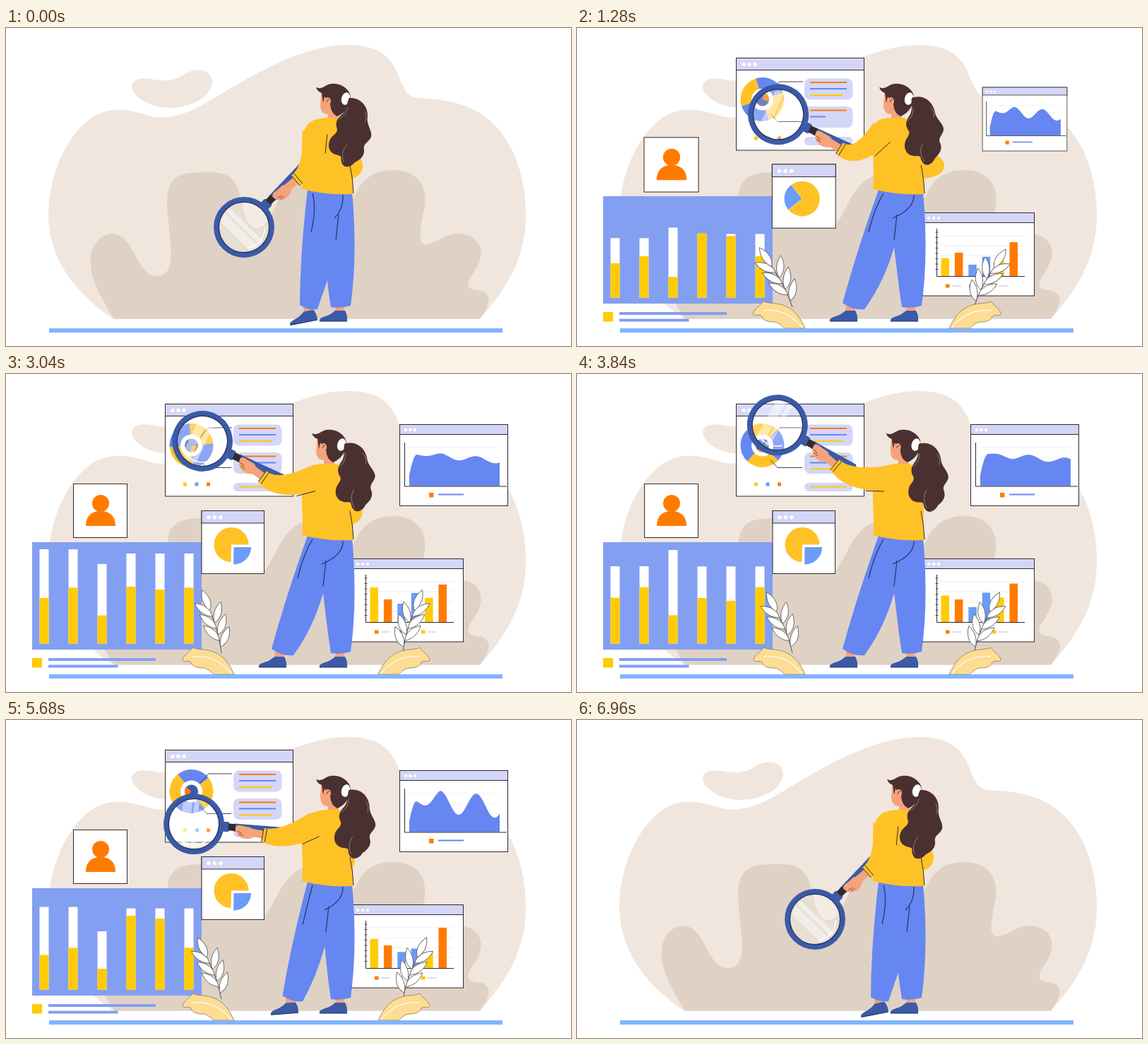
An HTML page for the animation above (7000 ms loop, 800 px wide and 450 px high).

```html
<!DOCTYPE html>
<html lang="en">
<head>
<meta charset="utf-8">
<title>Data research</title>
<style>
  html, body { margin: 0; width: 100%; height: 100%; overflow: hidden; background: #fff; }
  svg { display: block; width: 100vw; height: 100vh; }
</style>
</head>
<body>
<svg id="stage" viewBox="0 0 800 450"></svg>
<script>
const LOOP = 7000;
const C = { sand: '#f0e6dd', hill: '#dfd2c5', blue: '#6686f2', panel: '#839ff1', sky: '#6a9cf8', navy: '#3b5aa7', crease: '#26335f',
  yellow: '#ffc226', gold: '#ffcb05', orange: '#ff7b00', lilac: '#d4d6f8', ink: '#33292c', hair: '#4b3031', skin: '#f6a37c' };

// ---------- markup helpers ----------
const rect = (x, y, w, h, fill, extra = '') => `<rect x="${x}" y="${y}" width="${w}" height="${h}" fill="${fill}" ${extra}/>`;
const circle = (x, y, r, fill, extra = '') => `<circle cx="${x}" cy="${y}" r="${r}" fill="${fill}" ${extra}/>`;
const path = (d, fill, extra = '') => `<path d="${d}" fill="${fill}" ${extra}/>`;
const line = (d, color, width = 1, extra = '') =>
  `<path d="${d}" fill="none" stroke="${color}" stroke-width="${width}" ${extra}/>`;
const group = (id, body) => `<g id="${id}">${body}</g>`;
const repeat = (n, f) => Array.from({ length: n }, (_, i) => f(i)).join('');
const edge = `stroke="${C.ink}"`;
const frame = (x, y, w, h, head, dotX, gap, r) =>
  rect(x, y, w, h, '#fff', edge) + rect(x, y, w, head, C.lilac, edge) +
  repeat(3, i => circle(dotX + i * gap, y + head / 2 + .5, r, '#fff'));
const drawn = name => `pathLength="1" stroke-dasharray="1 2" class="${name}"`;
const wedge = (x, y, r, from, sweep) => {
  const at = a => `${x + r * Math.cos(a * Math.PI / 180)} ${y + r * Math.sin(a * Math.PI / 180)}`;
  return `M${x} ${y}L${at(from)}A${r} ${r} 0 0 1 ${at(from + sweep)}Z`;
};

// ---------- scene ----------
const backdrop =
  path('M152 411.500C102 378 60 330 60 262C62 192 98 137 130 122C162 108 190 121 210 126C240 130 268 116 300 96C350 66 420 24 485 24C530 24 546 44 555 66C565 92 570 97 582 99C625 101 664 106 697 143C724 174 736 220 736 265C736 322 712 366 671 411.500Z', C.sand) +
  path('M178 84C178 72 190 70 204 72C228 76 236 75 250 67C268 54 292 58 292 77C290 98 262 113 232 113C204 113 180 98 178 84Z', C.sand) +
  path('M153 411.500C132 378 117 350 120 322C126 292 152 284 167 298C184 314 189 351 215 351C239 349 234 316 231 284C227 244 221 208 262 205C290 203 315 201 326 222C337 244 335 284 358 283C380 278 384 214 432 206C460 210 480 262 495 235C508 207 528 201 550 201C586 202 598 228 592 256C586 288 582 307 596 306C612 304 622 291 640 291C668 292 680 312 668 336C662 348 652 357 655 366C660 373 670 369 678 374C688 382 684 394 671 411.500Z', C.hill);

const note = (i, y, h, rows) =>
  group('note' + i, rect(322, y, 68.5, h, C.lilac, `rx="${Math.min(8, h / 2)}"`)) +
  rows.map((c, k) => line(`M330 ${y + 5.5 + k * 9}H${k === 2 ? 377 : 382}`, c, 2, drawn('ink'))).join('');
const report = frame(225.5, 42.5, 181, 130.5, 17, 236, 8, 2.7) +
  repeat(4, i => path('', i % 2 ? C.yellow : C.blue, 'class="ring"')) +
  circle(262.5, 101, 15.5, '#fff') + circle(262.5, 101, 9.5, C.navy) + path('', C.orange, 'id="core"') +
  line('M275 89L287 76H320', C.ink, .9, drawn('lead')) + line('M274 122L284 132.5H319', C.ink, .9, drawn('lead')) +
  note(0, 71.5, 30, [C.orange, C.blue, C.gold]) + note(1, 111, 30, [C.orange, C.blue, C.gold]) + note(2, 154, 12, [C.gold]) +
  [C.gold, C.sky, C.orange].map((c, i) => rect(251 + i * 16.5, 153.5, 5, 5, c)).join('');

const columns = rect(37, 238, 240, 152, C.panel) +
  repeat(6, i => rect(47.5 + i * 41, 0, 13, 0, '#fff', 'class="total"') + rect(47.5 + i * 41, 0, 13, 0, C.gold, 'class="part"'));
const caption = rect(37, 402, 14, 13.5, C.gold) + rect(60, 402, 152, 4, C.panel) + rect(60, 411.5, 98.5, 4, C.panel);

const bars = frame(489.5, 261.5, 158, 117.5, 14, 498, 7, 2.2) +
  repeat(4, i => line(`M510 ${294 + i * 14}H634`, '#eeeeee')) +
  [C.gold, C.orange, C.sky, C.sky, C.gold, C.orange].map((c, i) => rect(515.5 + i * 19.4, 0, 11.5, 0, c, 'class="bar"')).join('') +
  line('M509.5 284V351.5H634', C.ink) + repeat(8, i => line(`M507.5 ${289 + i * 7.5}h4`, C.ink, .8)) +
  [C.orange, C.sky, C.gold].map((c, i) =>
    rect(522 + i * 33, 362.5, 5.5, 5, c) + line(`M${531 + i * 33} 365h13`, '#b9bfd6')).join('');

const pie = frame(277, 193.5, 88.5, 89, 17.5, 287, 8.5, 2.7) +
  circle(319, 241.5, 24.5, C.yellow) + path('', '#fff', 'id="gap"') + path('', C.sky, 'id="slice"');

const area = frame(557.5, 71.5, 153, 115, 14, 566, 6.5, 2.2) +
  repeat(4, i => line(`M565 ${104 + i * 14}H699`, '#f0f0f0')) +
  path('', C.blue, 'id="hills"') + line('M564.5 97V159H709', C.ink) +
  rect(599, 168, 6.5, 6.5, C.orange) + line('M612 170.5h36', C.blue, 2);

const person = rect(95.5, 155.5, 76, 76, '#fff', edge) + circle(134, 183, 12, C.orange) +
  path('M113 215C113 201 121 194 134 194C147 194 155 201 155 215Z', C.orange);

const leaf = i => {
  const u = .15 + i * .14, x = 10 * u * (1 - u) + 20 * u * u, y = -60 * u;
  const lean = 10 + 12 * u + (i === 6 ? 0 : i % 2 ? 34 : -34);
  return `<g transform="translate(${x} ${y}) rotate(${lean})">` +
    path('M0 0C-8 -9 -6 -21 1 -31C7 -20 6 -9 0 0Z', '#fff', 'stroke="#666" stroke-width=".9"') + '</g>';
};
const sprout = line('M0 0Q5 -30 20 -60', '#555') + repeat(7, leaf);
const husk = path('M527 425C533 412 540 401 552 395C566 388 578 391 586 387C590 394 600 398 600 405C597 409 594 404 588 408C586 415 578 416 570 416C562 418 560 422 556 425Z', '#fddd93', 'stroke="#8b7a5c" stroke-width=".8"') +
  line('M531 424C544 408 562 397 586 400', '#fff', 1.2);

const lens = circle(0, 0, 37, '#fff', 'fill-opacity=".25"') +
  `<g clip-path="url(#glass)" fill="#fff" fill-opacity=".45">` +
  '<rect x="-18" y="-40" width="13" height="80"/><rect x="-2" y="-40" width="7" height="80"/></g>' +
  line('M20 22A30 30 0 0 1 -18 24', '#fff', 1.5) +
  path('M57 -5.500L124 -6Q131 0 124 6L57 5.500Z', C.navy) +
  rect(41, -7, 9, 14, C.navy, 'rx="1.5"') + rect(49, -5, 10, 10, C.ink) +
  circle(0, 0, 39.2, 'none', `stroke="${C.navy}" stroke-width="7.4"`) +
  circle(0, 0, 35.6, 'none', `stroke="${C.crease}" stroke-width="1.3"`);

const shoe = path('M-16 -22H-5L-3 -12H-17Z', C.skin) +
  path('M0 0H-39Q-41 -4 -31 -7Q-22 -10 -17 -15H-3Q1 -8 0 0Z', C.navy) + line('M-39 0H0', C.crease, 1.2);

const tail = path('M486 99C500 98 512 108 512 125C510 138 519 145 517 154C514 162 505 163 507 172C508 182 500 187 494 190C488 198 478 198 476 192C472 184 478 182 470 180C458 178 455 168 458 160C461 150 472 150 468 140C466 130 472 126 478 120C484 112 482 106 486 99Z', C.hair) +
  line('M484 112Q482 124 471 129M483 165Q473 176 478 190M508 118Q512 128 508 134', '#8d7d7f', .9);
const head = path('M447 86L445 108Q445 122 456 122V130H470L474 100Z', C.skin) +
  path('M439 84Q446 87 452 82C462 75 481 79 487 93C490 106 482 120 469 125Q460 121 459 108L451 97L449 106L447 92Q441 90 439 84Z', C.hair) +
  `<ellipse cx="455.5" cy="103.5" rx="4.5" ry="5.5" fill="${C.skin}"/>` + line('M454 105Q454 101 458 101', C.ink, .8) +
  '<ellipse cx="481" cy="100" rx="6" ry="9" fill="#fff" transform="rotate(15 481 100)"/>';
const hand = path('M-13 -5Q-10 -9 -3 -7L9 -6Q17 1 13 8Q3 13 -5 9Q-13 5 -13 -5Z', C.skin) +
  line('M-10 1L-3 3M-8 5L-1 6', '#7d4a3d', .9);

const stage = document.getElementById('stage');
stage.innerHTML = '<defs><clipPath id="glass"><circle r="33"/></clipPath></defs>' + backdrop +
  group('report', report) + group('bars', bars) + group('columns', columns) + group('caption', caption) +
  group('pie', pie) + group('area', area) + group('person', person) +
  group('sproutR', sprout) + group('huskR', husk) + group('sproutL', sprout) + group('huskL', husk) +
  rect(61, 425, 642, 6, '#82b4ff') +
  group('lens', lens) + group('foot', shoe) + `<g transform="translate(483 415)">${shoe}</g>` +
  path('', C.blue, 'id="trousers"') + line('', C.crease, 1.2, 'id="creases"') +
  path('', C.yellow, 'id="rearArm"') + group('head', head) + path('', C.yellow, 'id="torso"') +
  line('', C.ink, 1, 'id="seam"') + group('tail', tail) +
  line('', C.skin, 11, 'id="wrist" stroke-linecap="round"') + group('hand', hand) +
  path('', C.yellow, 'id="arm"') + line('', C.ink, 1, 'id="folds"');

const $ = id => document.getElementById(id);
const all = name => [...stage.querySelectorAll('.' + name)];
const draw = (id, d) => $(id).setAttribute('d', d);
const move = (id, value) => $(id).setAttribute('transform', value);
const rings = all('ring'), inks = all('ink'), leads = all('lead'), totals = all('total'), parts = all('part'), barEls = all('bar');

// ---------- motion helpers ----------
const clamp = v => Math.min(1, Math.max(0, v));
const ease = v => { const p = clamp(v); return p * p * (3 - 2 * p); };
const wave = (t, peak, period) => Math.cos(2 * Math.PI * (t - peak) / period);
const settle = (p, s) => 1 + (s + 1) * (p - 1) ** 3 + s * (p - 1) ** 2;
const pop = (t, start, end, s = .9) => {
  const span = s ? 950 : 684;
  return settle(clamp((t - start) / span), s) * settle(clamp((end - t) / span), s);
};
const zoom = (id, x, y, k) => {
  $(id).style.display = k < .004 ? 'none' : '';
  move(id, `translate(${x} ${y}) scale(${k}) translate(${-x} ${-y})`);
};
const trace = (el, p) => {
  el.setAttribute('stroke-dashoffset', 1 - clamp(p));
  el.style.visibility = p <= 0 ? 'hidden' : '';
};
const raise = (els, tops, base) => els.forEach((el, i) => {
  el.setAttribute('y', tops[i]);
  el.setAttribute('height', Math.max(0, base - tops[i]));
});

function drawCharts(t) {
  const beat = wave(t, 2000, 3680), swell = wave(t, 3040, 3280), hump = Math.sin(Math.PI * t / LOOP) ** 2;

  zoom('report', 316, 107.5, pop(t, 200, 6940));
  zoom('columns', 157, 314, pop(t, 345, 6750, 0));
  zoom('caption', 78, 379, pop(t, 524, 6700, 0));
  zoom('bars', 568.5, 320, pop(t, 278, 6850));
  zoom('pie', 321, 238, pop(t, 485, 6750));
  zoom('area', 634, 129, pop(t, 1000, 6950));
  zoom('person', 134, 194, pop(t, 740, 6850));

  const spin = 94 - 245 * ease(t / LOOP);
  rings.forEach((el, i) => el.setAttribute('d', wedge(262.5, 101, 31, spin + 180 + i * 90, 90.3)));
  draw('core', wedge(262.5, 101, 9.5, -spin, 92));
  [86, 126, 160].forEach((y, i) => zoom('note' + i, 356, y, settle(clamp((t - 150 - i * 170) / 700), .3)));
  inks.forEach((el, i) => trace(el, (t - 380 - i * 200) / 240));
  leads.forEach(el => trace(el, (t - 480) / 600));

  raise(totals, totals.map((_, i) => i === 2 ? 274 + 25 * beat : 273 - (i < 2 ? 25 : 19) * swell), 381.5);
  raise(parts, [340 - 24 * hump, 332 - 31 * hump, 357 - 16 * hump, 297 - 20 * beat, 301 - 20 * beat, 332 - 31 * hump], 381.5);
  const dip = Math.exp(-(((t - 2000) / 500) ** 2));
  raise(barEls, [314 - 12 * swell, 319 - 8 * dip, 330 - 5 * swell, 330 - 21 * hump, 334 - 18 * hump, 302 - 10 * t / LOOP + 23 * dip], 351);

  const turn = 360 * (ease((t - 640) / 1500) + ease((t - 3900) / 1400));
  const shift = 5 * Math.cos(turn * Math.PI / 360) ** 2, mid = (turn + 45) * Math.PI / 180;
  draw('gap', shift > .5 ? wedge(319, 241.5, 25.5, turn, 91) : '');
  draw('slice', wedge(319 + shift * Math.cos(mid), 241.5 + shift * Math.sin(mid), 24.5, turn, 91));

  let ridge = 'M571 158.5';
  for (let x = 571; x <= 699; x += 2) {
    const swing = (6 + 10 * beat) * clamp((x - 575) / 40) * wave(x, 615, 51);
    const y = 115 + .08 * (x - 600) - swing;
    ridge += `L${x} ${158 - (158 - y) * Math.sin(Math.PI / 2 * clamp((x - 568) / 14))}`;
  }
  draw('hills', ridge + 'V158.5Z');

  const grow = (side, flip, x, start) => {
    const stem = pop(t, start, 6850), body = pop(t, start + 160, 6850);
    $('sprout' + side).style.display = stem < .004 ? 'none' : '';
    $('husk' + side).style.display = body < .004 ? 'none' : '';
    move('sprout' + side, `${flip}translate(${x} 395) rotate(${3 - 6 * swell}) scale(${stem})`);
    move('husk' + side, `${flip}translate(540 425) scale(${body}) translate(-540 -425)`);
  };
  grow('R', '', 562, 230);
  grow('L', 'translate(850 0) scale(-1 1) ', 545, 600);
}

// ---------- woman ----------
// time, x, y and tilt of the magnifier
const lensKeys = [[0, 337, 282, -46], [640, 305, 257, -33], [1300, 285, 122, 25], [1900, 285, 122, 25],
  [3040, 278, 95, 25], [4680, 290, 58, 34], [5080, 290, 58, 34], [5680, 266, 147, 5], [6500, 337, 282, -46]];

// Smooth path through the keys, without overshoot
function lensAt(t) {
  const n = lensKeys.length - 1;
  if (t >= lensKeys[n][0]) return lensKeys[n].slice(1);
  const i = lensKeys.findIndex(k => k[0] > t) - 1, [a, b] = [lensKeys[i], lensKeys[i + 1]];
  const slope = (j, k) => (lensKeys[j + 1][k] - lensKeys[j][k]) / (lensKeys[j + 1][0] - lensKeys[j][0]);
  const tangent = (j, k) => {
    if (j === 0 || j === n) return 0;
    const p = slope(j - 1, k), q = slope(j, k);
    return p * q > 0 ? 2 * p * q / (p + q) : 0;
  };
  const span = b[0] - a[0], u = (t - a[0]) / span;
  return [1, 2, 3].map(k => a[k] + (b[k] - a[k]) * ease(u) +
    span * u * (1 - u) * ((1 - u) * tangent(i, k) - u * tangent(i + 1, k)));
}

const mix = (p, q, u) => [p[0] + (q[0] - p[0]) * u, p[1] + (q[1] - p[1]) * u];
const off = (p, n, d) => [p[0] + n[0] * d, p[1] + n[1] * d];
const normal = (p, q) => {
  const d = Math.hypot(q[0] - p[0], q[1] - p[1]);
  return [(q[1] - p[1]) / d, (p[0] - q[0]) / d];
};

function drawArm(shoulder, grip) {
  const BONE = 52, reach = Math.hypot(grip[0] - shoulder[0], grip[1] - shoulder[1]);
  const bend = Math.sqrt(Math.max(0, BONE * BONE - reach * reach / 4));
  const across = normal(shoulder, grip), elbow = off(mix(shoulder, grip, .5), across, bend);
  const upper = normal(shoulder, elbow), fore = normal(elbow, grip);
  const cuff = mix(elbow, grip, .5), under = off(elbow, across, 22), armpit = off(shoulder, upper, 18);
  const hem = u => `M${off(mix(elbow, grip, u), fore, -9.5)}L${off(mix(elbow, grip, u), fore, 9.5)}`;
  draw('wrist', `M${grip}L${cuff}`);
  draw('arm', `M${off(shoulder, upper, -18)}Q${off(elbow, across, -8)} ${off(cuff, fore, -9.5)}` +
    `L${off(cuff, fore, 9.5)}Q${under} ${armpit}L462 150Z`);
  draw('folds', hem(.49) + hem(.4) + `M${armpit}L${mix(armpit, under, .45)}`);
}

function drawWoman(t) {
  const step = ease((t - 40) / 1260) * ease((6500 - t) / 1420), split = Math.sqrt(step);
  const lean = 1 - ease((t - 1800) / 2600);
  const hx = -11 * step * lean, hy = 28 * step * (1 - step) * lean, low = hy * .7;
  const swing = -step * (11.5 + 4.5 * lean), rear = 512 + step * (44 * lean - 24);
  const [lx, ly, tilt] = lensAt(t);

  move('lens', `translate(${lx} ${ly}) rotate(${tilt})`);
  move('head', `translate(${hx} ${hy})`);
  move('tail', `translate(${hx} ${hy}) rotate(${swing} 485 102)`);

  const fx = 441 - 44 * step, fy = 413 + 2 * step;
  const hemL = [fx - 25 + 4 * step, 392 - 3 * step], hemR = [fx + 10 * step, 398], crotch = [455 - 6 * step, 357 - 47 * split];
  const knee = off(mix([427, 229], hemL, .5), [-1, 1], 5), shin = off(mix(crotch, hemR, .5), [1, .8], 7 * step);
  move('foot', `translate(${fx} ${fy}) rotate(${11 * step - 11})`);
  draw('trousers', `M427 229Q${knee} ${hemL}Q${(hemL[0] + hemR[0]) / 2} 400 ${hemR}Q${shin} ${crotch}` +
    'Q456 370 460 395Q474 397 488 393Q498 320 490 232Z');
  const foldA = 432 - 19 * step, foldB = 467 - 18 * split;
  draw('creases', `M434 234Q${foldA + 8} 255 ${foldA} 289M477 236Q478 256 ${foldB - 2} 269M${foldB + 4} 264L${foldB} 300`);

  draw('rearArm', `M484 ${174 + low}C${rear} ${176 + low} ${rear} ${214 + low} 484 ${213 + low}Z`);
  draw('torso', `M${456 + hx} ${127 + low}C${438 + hx} ${128 + low} ${420 + hx / 2} ${130 + low} 419 ${165 + low}` +
    `C418 190 422 205 419 ${228 + low}Q455 ${237 + low} 492 ${235 + low}Q491 205 488 175` +
    `C488 145 ${482 + hx / 2} ${128 + low} ${470 + hx} ${127 + low}Z`);
  draw('seam', `M487 ${194 + low}Q491 212 492 ${234 + low}`);

  const a = tilt * Math.PI / 180;
  const grip = [lx + 72 * Math.cos(a) - 4 * Math.sin(a), ly + 72 * Math.sin(a) + 4 * Math.cos(a)];
  move('hand', `translate(${grip}) rotate(${tilt})`);
  drawArm([437 + hx / 2, 148 + low], grip);
}

function tick(now) {
  const t = now % LOOP;
  drawCharts(t);
  drawWoman(t);
  requestAnimationFrame(tick);
}
tick(0);
</script>
</body>
</html>
```
